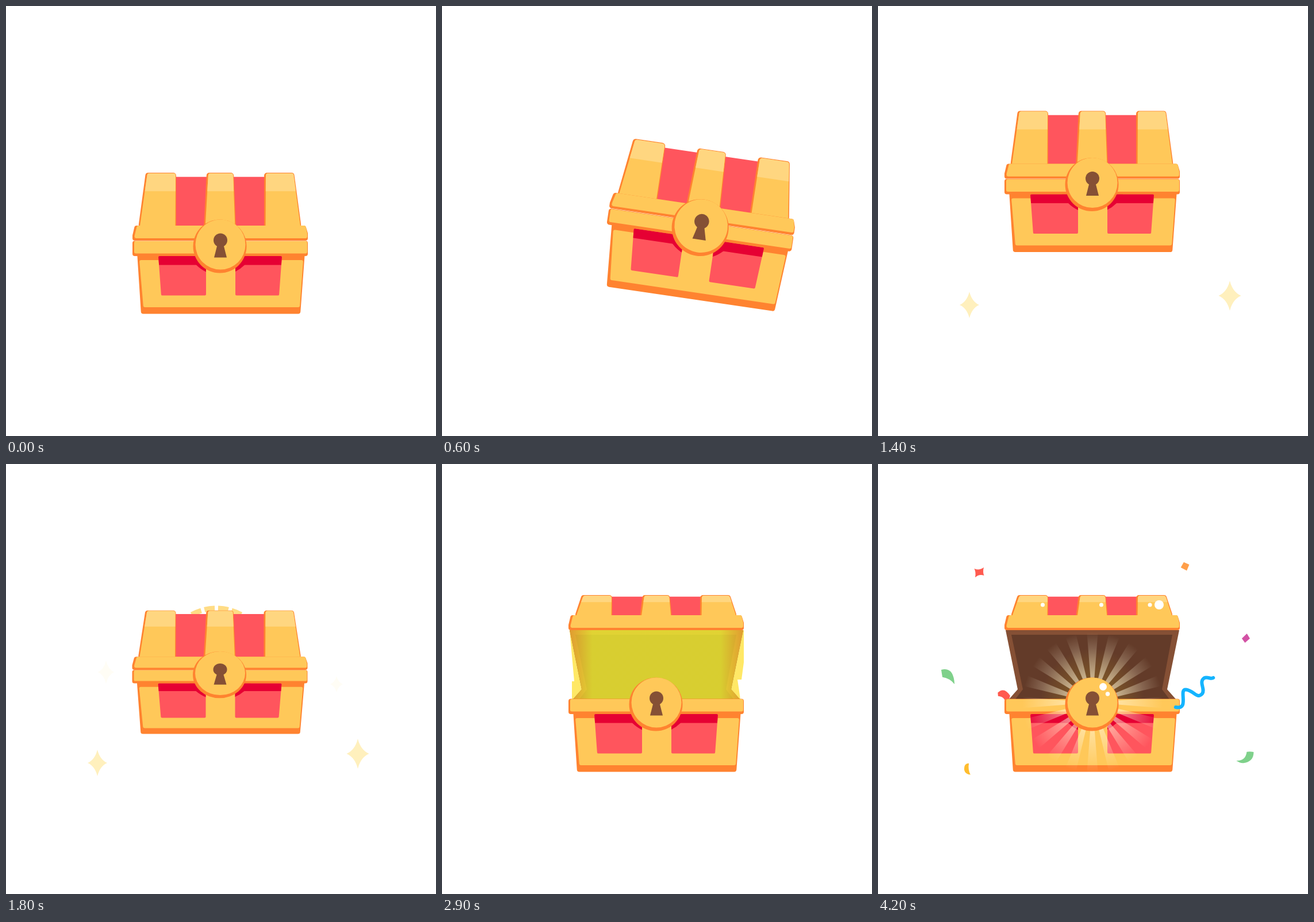
An HTML page with a canvas that plays this animation: 748 px wide and 748 px high, repeating every 4300 ms.

```html
<!DOCTYPE html>
<html>
<head>
<meta charset="utf-8">
<style>
html, body { margin: 0; width: 748px; height: 748px; overflow: hidden; background: #fff; }
canvas { display: block; }
</style>
</head>
<body>
<canvas id="stage" width="748" height="748"></canvas>
<script>
const c = document.getElementById('stage').getContext('2d');
const LOOP = 4300, STEP = 100;
const GOLD = '#ffc859', EDGE = '#ff8330', LIGHT = '#ffd680', RED = '#ff555d', DARK_RED = '#e60033', BROWN = '#855035';

const clamp = v => Math.max(0, Math.min(1, v));
const ramp = (t, a, b) => clamp((t - a) / (b - a));
const smooth = u => u * u * (3 - 2 * u);

// Corner-rounded polygon from a flat list of coordinates
function poly(fill, radius, ...p) {
  const n = p.length;
  c.beginPath();
  c.moveTo((p[0] + p[n - 2]) / 2, (p[1] + p[n - 1]) / 2);
  for (let i = 0; i < n; i += 2) c.arcTo(p[i], p[i + 1], p[(i + 2) % n], p[(i + 3) % n], radius);
  c.closePath();
  c.fillStyle = fill;
  c.fill();
}

function disc(fill, x, y, r) {
  c.beginPath();
  c.arc(x, y, r, 0, 7);
  c.fillStyle = fill;
  c.fill();
}

function faded(alpha, draw) {
  if (alpha <= 0) return;
  c.save();
  c.globalAlpha *= alpha;
  draw();
  c.restore();
}

// time, dx, dy, degrees, scaleX, scaleY around the middle of the chest's foot
const POSES = [
  [0, 0, 0, 0, 1, 1],
  [300, -75, -28, -9, 1.07, 1.07],
  [600, 59, -26, 8.4, 1.065, 1.065],
  [700, 62, -30, 8.8, 1.07, 1.07],
  [1000, 15, -3, 1.9, 1, 0.91],
  [1200, 0, 0, 0, 1, 0.86],
  [1500, 0, -145, 0, 1, 1.05],
  [1800, -0.5, -66, 0, 1, 0.875],
  [2000, 0, 0, 0, 1, 0.94],
  [2100, 0, 0, 0, 1, 1],
  [LOOP, 0, 0, 0, 1, 1]
];

function poseAt(t) {
  const i = POSES.findIndex(k => k[0] > t), a = POSES[i - 1], b = POSES[i];
  const u = smooth(ramp(t, a[0], b[0]));
  return a.map((v, j) => v + (b[j] - v) * u);
}

function interior(t, open) {
  const top = 408 - 119 * open, knee = 408 - 16 * open;
  const shell = [222, top, 524, top, 503, knee, 518, 409, 228, 409, 243, knee];
  const shine = 1 - ramp(t, 2800, 3200);
  faded(shine, () => poly('#ffe033', 0, 222, top, 525, top, 525, 345, 521, 375, 514, 375, 519, 409, 226, 409, 226, 378, 230, 378));
  poly(BROWN, 0, ...shell);
  poly('#633b29', 0, 232, top + 8, 512, top + 8, 494, knee, 507, 409, 239, 409, 252, knee);

  const halo = c.createRadialGradient(373, 410, 30, 373, 410, 90);
  halo.addColorStop(0, 'rgba(200,165,40,.75)');
  halo.addColorStop(1, 'rgba(200,165,40,0)');
  faded(ramp(t, 3000, 3400) * (1 - 0.6 * ramp(t, 3600, 4200)), () => poly(halo, 0, ...shell));

  const gold = c.createLinearGradient(222, 0, 524, 0);
  gold.addColorStop(0, '#ffb52e');
  gold.addColorStop(0.13, '#ffff33');
  gold.addColorStop(0.87, '#ffff33');
  gold.addColorStop(1, '#ffb52e');
  faded(shine, () => poly(gold, 0, ...shell));
}

function base() {
  poly(EDGE, 4, 228, 428, 520, 428, 512, 535.5, 235, 535.5);
  poly(GOLD, 3, 232, 442, 517, 442, 511, 524, 239, 524);
  poly(GOLD, 0, 348, 434, 399, 434, 399, 460, 348, 460);
  for (const p of [[265, 435, 348, 435, 348, 503.5, 270, 503.5], [399, 435, 480, 435, 475, 503.5, 399, 503.5]]) {
    c.save();
    poly(RED, 2, ...p);
    c.clip();
    c.fillStyle = DARK_RED;
    c.fillRect(260, 430, 225, 20.5);
    disc(DARK_RED, 373, 409, 59);
    c.restore();
  }
  poly(EDGE, 4, 220, 408.5, 525, 408.5, 525, 435, 220, 435);
  poly(GOLD, 3, 223, 409, 524, 409, 524, 430.5, 223, 430.5);
}

function rays(alpha) {
  const beam = c.createRadialGradient(373, 415, 40, 373, 415, 122);
  beam.addColorStop(0, 'rgba(255,245,215,.6)');
  beam.addColorStop(1, 'rgba(255,245,215,0)');
  faded(alpha, () => {
    c.beginPath();
    for (let i = 0; i < 20; i++) {
      const a = -Math.PI / 2 + i * Math.PI / 10, w = Math.PI / 40;
      c.moveTo(373, 415);
      c.arc(373, 415, 122, a - w, a + w);
    }
    c.fillStyle = beam;
    c.fill();
  });
}

function lid(open) {
  const top = 290 - 62 * open, band = 382 - 119 * open;
  const y = v => top + (band - top) * v;
  const strap = (l, r, bl, br) => {
    poly(EDGE, 5, l, top, r, top, br, band + 4, bl, band + 4);
    c.save();
    poly(GOLD, 4, l + 3, top + 1, r - 1, top + 1, br - 1.5, band + 4, bl + 2.5, band + 4);
    c.clip();
    c.fillStyle = LIGHT;
    c.fillRect(l - 20, top, r - l + 40, y(0.35) - top);
    c.restore();
  };
  poly(RED, 0, 294, y(0.08), 350, y(0.08), 346, band + 2, 294, band + 2);
  poly(RED, 0, 395, y(0.08), 450, y(0.08), 450, band + 2, 398, band + 2);
  strap(243, 296, 230, 296);
  strap(349, 396, 344, 400);
  strap(449, 501, 449, 514);
  poly(EDGE, 4, 224, band, 521, band, 525, band + 13, 525, band + 26, 220, band + 26, 220, band + 17);
  poly(GOLD, 3, 228, band, 521, band, 524, band + 13, 524, band + 22, 223, band + 22, 224, band + 16);
}

function lock() {
  disc(EDGE, 372, 418, 46.5);
  disc(GOLD, 373, 415, 43.5);
  disc(BROWN, 373, 407.5, 12);
  poly(BROWN, 0, 368, 414, 378, 414, 384, 437.5, 362, 437.5);
}

function gloss() {
  for (const [x, y, r] of [[286.5, 245, 3.5], [388.5, 245, 3.5], [473, 245, 3.5], [489, 245, 8], [391.5, 387.5, 6.5], [399.5, 400, 3.7]])
    disc('#fff', x, y, r);
}

function chest(t) {
  const [, dx, dy, deg, sx, sy] = poseAt(t);
  const open = smooth(ramp(t, 2150, 2590));
  c.save();
  c.translate(373 + dx, 535 + dy);
  c.rotate(deg * Math.PI / 180);
  c.scale(sx, sy);
  c.translate(-373, -535);
  if (open > 0) interior(t, open);
  base();
  rays(0.4 * ramp(t, 3200, 3600) + 0.6 * ramp(t, 3600, 4200));
  lid(open);
  lock();
  faded(ramp(t, 3000, 3300), gloss);
  c.restore();
}

// x, y, half width, half height, opacity, then start and end of each twinkle
const SPARKLES = [
  [159, 520, 17, 23, 1, 100, 500, 1100, 1500, 1700, 2700],
  [612, 504, 19.5, 26, 1, 100, 500, 1100, 1500, 1600, 2200, 2600, 2900],
  [574, 399, 6, 7, 0.9, 900, 1100],
  [575, 383, 11, 14, 0.15, 1650, 1950],
  [174, 362, 14, 20, 0.15, 1650, 1950]
];

function sparkles(t) {
  for (const [x, y, w, h, alpha, ...spans] of SPARKLES)
    for (let i = 0; i < spans.length; i += 2) {
      const u = ramp(t, spans[i], spans[i + 1]);
      faded(alpha * Math.min(1, 3.5 * Math.sin(Math.PI * u)), () => {
        c.translate(x, y);
        c.scale(w, h);
        c.fillStyle = '#fff0bd';
        c.fill(new Path2D('M0-1Q.25-.25 1 0Q.25.25 0 1Q-.25.25-1 0Q-.25-.25 0-1'));
      });
    }
}

function dashRing(t) {
  if (t < 1700 || t > 1900) return;
  c.strokeStyle = '#ffdc85';
  c.lineWidth = 9;
  for (let i = -2; i < 2; i++) {
    const a = -Math.PI / 2 + (i + 0.5) * 0.265;
    c.beginPath();
    c.arc(366, 341, 90, a - 0.1, a + 0.1);
    c.stroke();
  }
}

// x, y, colour, outline, spin
const CONFETTI = [
  [176, 173, '#ff5a4f', 'M-9-5Q0-2 7-9Q6 0 9 5Q0 3-6 10Q-5 2-9-5', 10],
  [534, 163, '#ff9f4a', 'M-3-7L7-4L4 7L-7 3Z', 12],
  [640, 288, '#d352a5', 'M1-8L7 0L-1 8L-7 1Z', 8],
  [122, 355, '#7fd18b', 'M-11-13Q11-17 10 14Q3 3-10 0Z', -8],
  [219, 390, '#ff5a4f', 'M-10-8Q2-18 11-1Q9 6 2 14Q3 0-10-2Z', -8],
  [155, 516, '#ffbd2e', 'M4-10Q-5-11-5 1Q-4 8 5 10Q1 0 4-10', -8],
  [639, 495, '#7fd18b', 'M3-9Q8-10 15-8Q14 9-4 10Q-10 10-16 5Q0 7 3-9', -6]
];
const RIBBON = [550, 383, '#14b4ff', 'M-33 24C-8 30-28-8-14-6C0-4 4 12 14 2C20-6 8-18 18-25C24-28 30-22 34-25', -3];

function confetti(t, [x, y, color, outline, spin], stroked) {
  const u = ramp(t, 3050, 3600);
  if (!u) return;
  const away = 1 - (1 - u) ** 3, late = (t - 3600) / 1000;
  const lift = 950 * u * (1 - u) ** 2;
  c.save();
  c.translate(373 + (x - 373) * away, 390 + (y - 390) * away - lift + 25 * late);
  c.rotate(spin * late * Math.PI / 180 + (1 - away) * spin / 3);
  const shape = new Path2D(outline);
  if (stroked) {
    c.strokeStyle = color;
    c.lineWidth = 6;
    c.lineCap = 'round';
    c.stroke(shape);
  } else {
    c.fillStyle = color;
    c.fill(shape);
  }
  c.restore();
}

function render(now) {
  const t = Math.floor(now % LOOP / STEP) * STEP;
  c.clearRect(0, 0, 748, 748);
  sparkles(t);
  dashRing(t);
  CONFETTI.forEach(piece => confetti(t, piece));
  chest(t);
  confetti(t, RIBBON, true);
}

const start = performance.now();
function tick() {
  render(performance.now() - start);
  requestAnimationFrame(tick);
}
tick();
</script>
</body>
</html>
```
